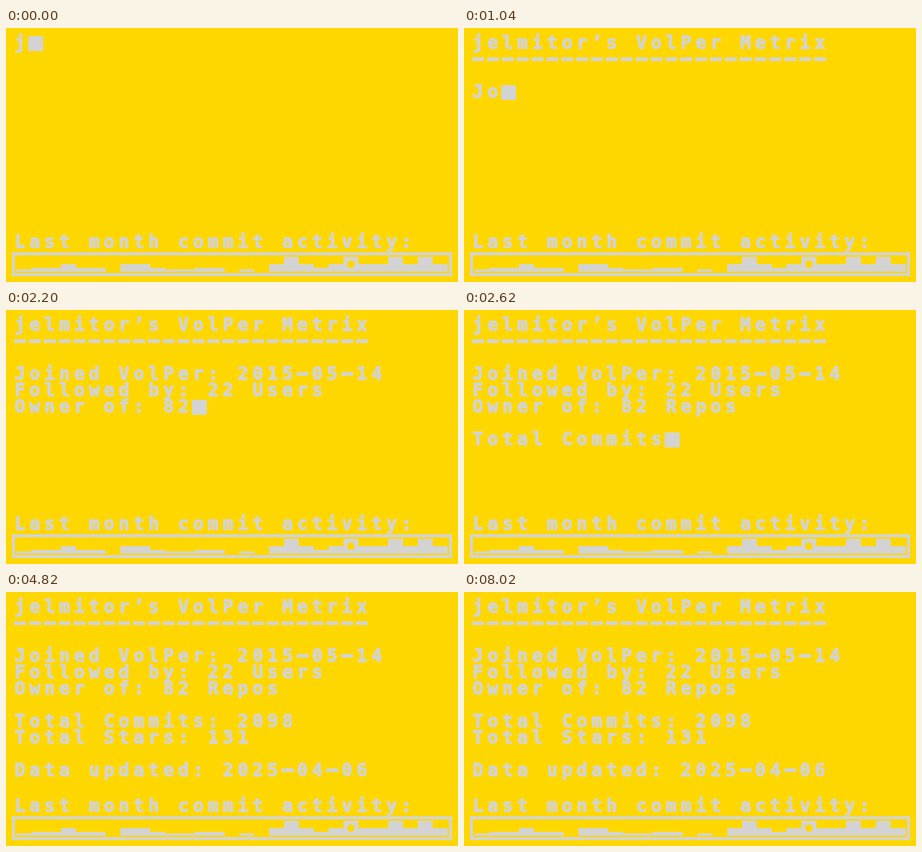
An HTML page that plays this animation: 608x342 px, repeating every 8420 ms.

```html
<!DOCTYPE html>
<html lang="en">
<head>
<meta charset="utf-8">
<title>Commit metrics terminal</title>
<style>
  html, body { margin: 0; width: 100%; height: 100%; overflow: hidden; background: #ffd700; }
  pre, svg, #cursor { position: absolute; margin: 0; }
  pre {
    left: 11.5px; color: #d3d3d3;
    font: bold 24px/22px "DejaVu Sans Mono", monospace;
    letter-spacing: calc(20px - 1ch);
    -webkit-text-stroke: 1px #d3d3d3;
  }
  #screen { top: 9px; }
  #label { top: 277px; }
  #cursor { width: 20px; height: 20px; background: #d3d3d3; }
  svg { left: 0; top: 0; }
</style>
</head>
<body>
<svg width="608" height="342" fill="#d3d3d3" shape-rendering="crispEdges">
  <rect x="10" y="304" width="588" height="28" fill="none" stroke="#d3d3d3" stroke-width="4"/>
  <path id="bars"/>
  <circle cx="464" cy="318" r="5" fill="#ffd700"/>
</svg>
<pre id="screen"></pre>
<pre id="label">Last month commit activity:</pre>
<div id="cursor"></div>
<script>
const LOOP = 8420, STEP = 20, BLINK = 400;
const CELL = 20, LINE = 22;
const text = [
  "jelmitor’s VolPer Metrix",
  "━".repeat(24),
  "",
  "Joined VolPer: 2015━05━14",
  "Followed by: 22 Users",
  "Owner of: 82 Repos",
  "",
  "Total Commits: 2098",
  "Total Stars: 131",
  "",
  "Data updated: 2025━04━06"
].join("\n");
const typedAt = text.length * STEP;

const screenEl = document.getElementById("screen");
const cursor = document.getElementById("cursor");

// One digit per day, an index into the bar heights
const heights = [0, 3, 5, 10, 20];
const days = "12232203321122010343234334343";
document.getElementById("bars").setAttribute("d",
  [...days].map((level, i) => {
    const h = heights[level];
    return `M${14 + i * CELL} 328v${-h}h${CELL}v${h}z`;
  }).join(""));

function draw(t) {
  const typed = text.slice(0, Math.floor(t / STEP) + 1);
  const lines = typed.split("\n");
  const row = lines.length - 1;
  screenEl.textContent = typed;
  cursor.style.left = 10 + lines[row].length * CELL + "px";
  cursor.style.top = 11 + row * LINE + "px";
  const off = t >= typedAt && Math.floor((t - typedAt) / BLINK) % 2;
  cursor.style.visibility = off ? "hidden" : "visible";
}

const start = performance.now();
function tick() {
  draw((performance.now() - start) % LOOP);
  requestAnimationFrame(tick);
}
draw(0);
requestAnimationFrame(tick);
</script>
</body>
</html>
```
